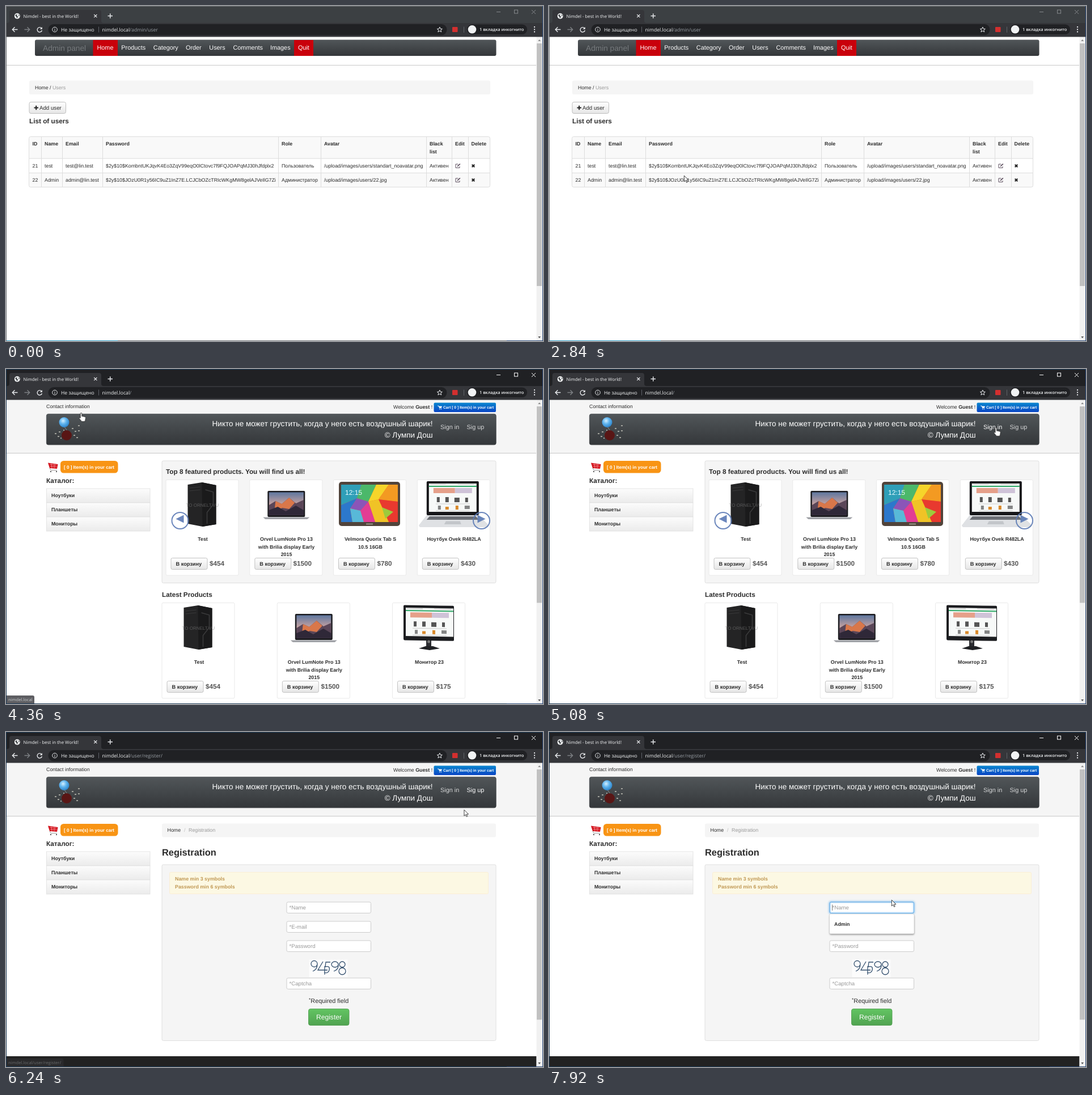
These frames come from a looping animation (947 px wide and 591 px high, 8000 ms). An HTML page:

```html
<!DOCTYPE html>
<html lang="ru">
<head>
<meta charset="utf-8">
<title>Nimdel</title>
<style>
html, body { margin: 0; width: 100%; height: 100%; overflow: hidden; background: #fff; }
svg { display: block; width: 100%; height: 100%; }
text { font: 8.85px "Liberation Sans", Arial, sans-serif; fill: #2c2c2c; white-space: pre; text-rendering: geometricPrecision; }
.ui text { font-family: "Open Sans", "Noto Sans", sans-serif; fill: #f1f3f4; }
.ui .path { fill: #9aa0a6; }
.ui .url { font-size: 8.65px; }
.b, .b text { font-weight: 700; }
.mid text, text.mid { text-anchor: middle; }
.quote text { font-size: 13.5px; fill: #fff; text-anchor: end; }
.nav text { font-size: 10.85px; fill: #fff; }
.h { font-size: 11.75px; font-weight: 700; }
.price text { font-size: 11.7px; font-weight: 700; fill: #555; }
.hint text { font-size: 9.65px; fill: #999; }
.warn text { fill: #c09853; font-weight: 700; }
.line { fill: none; stroke: #e8eaed; stroke-width: 1.4; }

/* One shared 8 s clock; 1% is 80 ms */
.a { animation: 8s step-end infinite; }
.admin { animation-name: admin; }
.shop { animation-name: shop; }
.home { animation-name: home; }
.reg { animation-name: reg; }
.loading { animation-name: loading; }
.idle { animation-name: idle; }
.bar { animation-name: bar; }
.ctl { animation-name: ctl; }
.edge { animation-name: edge; }
.url1 { animation-name: url1; }
.url2 { animation-name: url2; }
.url3 { animation-name: url3; }
.signin { animation-name: signin; }
.sigup { animation-name: sigup; }
.drop { animation-name: drop; }
.focus { animation: focus 8s linear infinite; }
.tip1 { animation: tip1 8s linear infinite; }
.tip2 { animation: tip2 8s linear infinite; }
.cur { animation: move 8s linear infinite; }
.arrow { animation-name: arrow; }
.hand { animation-name: hand; }
.click { animation-name: click; }

@keyframes admin { 0% { visibility: visible } 52%, 100% { visibility: hidden } }
@keyframes shop { 0% { visibility: hidden } 52%, 100% { visibility: visible } }
@keyframes home { 0% { visibility: hidden } 52% { visibility: visible } 74%, 100% { visibility: hidden } }
@keyframes reg { 0% { visibility: hidden } 74%, 100% { visibility: visible } }
@keyframes loading { 0% { visibility: hidden } 71.5% { visibility: visible } 74%, 100% { visibility: hidden } }
@keyframes idle { 0% { visibility: visible } 71.5% { visibility: hidden } 74%, 100% { visibility: visible } }
@keyframes bar { 0% { fill: #3c4043 } 49%, 100% { fill: #202124 } }
@keyframes ctl { 0% { stroke: #85888c } 49%, 100% { stroke: #fff } }
@keyframes edge { 0% { stroke: #6b6f73 } 49%, 100% { stroke: #1d3a56 } }
@keyframes url1 { 0% { visibility: visible } 51%, 100% { visibility: hidden } }
@keyframes url2 { 0% { visibility: hidden } 51% { visibility: visible } 71.5%, 100% { visibility: hidden } }
@keyframes url3 { 0% { visibility: hidden } 71.5%, 100% { visibility: visible } }
@keyframes signin { 0% { fill: #d6d7d8 } 63% { fill: #fff } 66%, 100% { fill: #d6d7d8 } }
@keyframes sigup { 0% { fill: #d6d7d8 } 66.5% { fill: #fff } 79%, 100% { fill: #d6d7d8 } }
@keyframes drop { 0% { visibility: hidden } 94%, 100% { visibility: visible } }
@keyframes focus { 0%, 92.4% { opacity: 0 } 95%, 100% { opacity: 1 } }
@keyframes tip1 { 0%, 42.5% { opacity: 0 } 46%, 52% { opacity: 1 } 54.5% { opacity: .8 } 57.5%, 100% { opacity: 0 } }
@keyframes tip2 { 0%, 66.5% { opacity: 0 } 69%, 75.5% { opacity: 1 } 78% { opacity: .45 } 80.5%, 100% { opacity: 0 } }
@keyframes arrow {
  0% { visibility: hidden } 17.5% { visibility: visible } 42.5% { visibility: hidden }
  56% { visibility: visible } 63% { visibility: hidden } 77%, 100% { visibility: visible }
}
@keyframes hand {
  0% { visibility: hidden } 42.5% { visibility: visible } 56% { visibility: hidden }
  63% { visibility: visible } 77%, 100% { visibility: hidden }
}
@keyframes click {
  0% { visibility: hidden } 48.4% { visibility: visible } 51% { visibility: hidden }
  69.5% { visibility: visible } 71% { visibility: hidden }
  88.4% { visibility: visible } 90.4%, 100% { visibility: hidden }
}
@keyframes move {
  0%, 17.4% { transform: translate(505px, 584px); animation-timing-function: cubic-bezier(.35, .1, .4, 1) }
  27.5%, 35.5% { transform: translate(238px, 299px); animation-timing-function: cubic-bezier(.4, 0, .4, 1) }
  45%, 54.5% { transform: translate(132.5px, 78px); animation-timing-function: cubic-bezier(.45, 0, .45, 1) }
  64.5% { transform: translate(796px, 104px); animation-timing-function: ease-out }
  68.5%, 75.5% { transform: translate(834.5px, 115px); animation-timing-function: cubic-bezier(.5, 0, .5, 1) }
  85.5% { transform: translate(583.5px, 320px); animation-timing-function: ease-in-out }
  88.4%, 94% { transform: translate(596px, 297px); animation-timing-function: ease-out }
  99%, 100% { transform: translate(604px, 296px) }
}
</style>
</head>
<body>
<svg viewBox="0 0 947 591">
<defs>
  <linearGradient id="dark" x2="0" y2="1"><stop stop-color="#515659"/><stop offset="1" stop-color="#34373a"/></linearGradient>
  <linearGradient id="btn" x2="0" y2="1"><stop stop-color="#fff"/><stop offset="1" stop-color="#e6e6e6"/></linearGradient>
  <linearGradient id="row" x2="0" y2="1"><stop stop-color="#fcfcfc"/><stop offset="1" stop-color="#ebebeb"/></linearGradient>
  <linearGradient id="blue" x2="0" y2="1"><stop stop-color="#0a86cf"/><stop offset="1" stop-color="#0a45c4"/></linearGradient>
  <linearGradient id="green" x2="0" y2="1"><stop stop-color="#62c462"/><stop offset="1" stop-color="#51a351"/></linearGradient>
  <linearGradient id="sky" x2="0" y2="1"><stop stop-color="#5f779f"/><stop offset=".55" stop-color="#c9a3a0"/><stop offset="1" stop-color="#4a3550"/></linearGradient>
  <radialGradient id="ball" cx=".4" cy=".35" r=".65"><stop stop-color="#d4efff"/><stop offset=".5" stop-color="#5fb4ee"/><stop offset="1" stop-color="#2f86cc"/></radialGradient>
  <filter id="soft" x="-10%" y="-30%" width="120%" height="170%"><feGaussianBlur stdDeviation="1.4"/></filter>

  <path id="cross" d="M-2.6-2.6 2.6 2.6M2.6-2.6-2.6 2.6"/>
  <g id="edit" fill="none" stroke="#4a3a4c"><path d="M1 .5H-3.500V7H3.500V4.500" stroke-width=".9"/><path d="M-.5 4.500 4.300 0" stroke-width="1.600"/></g>
  <path id="del" d="M-2.300-2.300 2.300 2.300M2.300-2.300-2.300 2.300" stroke="#222" stroke-width="2"/>

  <g id="card">
    <rect x=".5" y=".5" width="128" height="168.500" rx="2" fill="#fff" stroke="#e9e9e9"/>
    <rect x="9.500" y="138.500" width="64" height="20" rx="2.500" fill="url(#btn)" stroke="#c2c2c2"/>
    <text class="b" x="18" y="152" style="font-size:9.2px">В корзину</text>
  </g>
  <g id="tower">
    <path d="M39 9 64 5 89 10V79L65 83 39 78Z" fill="#242425"/>
    <path d="M64 5 89 10V79L65 83Z" fill="#1a1a1b"/>
    <path d="M42 15 61 13M42 20 61 18" stroke="#3a3a3b"/>
    <path d="M70 18 84 22V44L73 58V78" fill="none" stroke="#3c3c3d" stroke-width="1.500"/>
    <text x="36" y="48" style="font-size:8px;fill:#777" opacity=".65">TO ORNELT.VU</text>
  </g>
  <g id="note">
    <rect x="32" y="20" width="66" height="46" rx="2" fill="#1c1c20"/>
    <rect x="34.500" y="22.500" width="61" height="40" fill="url(#sky)"/>
    <path d="M34.500 45 46 38 57 43 70 32 82 42 95.500 36V62.500H34.500Z" fill="#5a4658"/>
    <path d="M46 38 57 43 70 32 80 41 70 52 58 50 44 56Z" fill="#d9774a"/>
    <path d="M34.500 54 50 48 64 56 82 46 95.500 54V62.500H34.500Z" fill="#2f2838"/>
    <path d="M24 66.500H106L102 70H28Z" fill="#a0a2a7"/>
  </g>
  <g id="tab">
    <rect x="10" y="4" width="108" height="78" rx="5" fill="#51443b"/>
    <g transform="translate(14 9)">
      <rect width="100" height="66" fill="#ef6a2d"/>
      <path d="M0 0H36L28 24 0 36Z" fill="#2f9fb8"/>
      <path d="M36 0H62L48 30 28 24Z" fill="#4bb86a"/>
      <path d="M62 0H84L66 26 48 30Z" fill="#f6d52a"/>
      <path d="M84 0H100V30L66 26Z" fill="#f39a22"/>
      <path d="M100 30V66H84L66 26Z" fill="#e8392f"/>
      <path d="M66 26 84 66H60L48 30Z" fill="#f0c326"/>
      <path d="M48 30 60 66H40L34 46Z" fill="#e23d94"/>
      <path d="M28 24 48 30 34 46 16 42Z" fill="#8b55b8"/>
      <path d="M0 36 28 24 16 42 20 66H0Z" fill="#2c78cc"/>
      <path d="M16 42 34 46 40 66H20Z" fill="#58b9d8"/>
      <path d="M72 40 92 48 78 60Z" fill="#9ccb3c"/>
      <text x="7" y="18" style="font-size:12px;fill:#e8fbff">12:15</text>
    </g>
    <path d="M58 78.500H70" stroke="#998" stroke-width="2"/>
  </g>
  <g id="shot">
    <rect width="84" height="50" fill="#f7f9f8"/>
    <path d="M0 5H84" stroke="#2da866" stroke-width="2"/><path d="M2 1.500H30M50 1.500H80" stroke="#bbb"/>
    <path d="M8 8H46V17H8Z" fill="#e5a08a"/><path d="M46 8H76V17H46Z" fill="#cfc3d8"/>
    <g fill="#555"><path d="M14 24H19V33H14ZM29 24H35V33H29ZM45 25H54V33H45ZM64 25H69V33H64Z"/><path d="M16 39H21V46H16ZM63 39H72V45H63Z" opacity=".7"/></g>
    <path d="M29 41H35V46H29ZM47 39H52V46H47Z" fill="#d98a2c"/>
    <path d="M12 36H72M12 48H72" stroke="#ccc"/>
  </g>
  <g id="laptop">
    <rect x="17" y="3" width="92" height="60" rx="2" fill="#17171a"/>
    <use href="#shot" x="21" y="7"/>
    <path d="M17 63H109L127 81 125 84H5L3 81Z" fill="#dfe1e4"/>
    <path d="M22 65H104L109 71H17Z" fill="#6c6f75"/><path d="M51 73.500H76L78 79H48Z" fill="#c3c6ca"/>
  </g>
  <g id="screen">
    <rect x="20" y="4" width="89" height="62" rx="2" fill="#1c1d20" transform="skewY(1)"/>
    <use href="#shot" transform="translate(24 9) skewY(1)"/>
    <path d="M60 67H69V78H60Z" fill="#2b2c30"/><path d="M47 81 59 77H72L84 81 66 84Z" fill="#1f2023"/>
    <circle cx="64.500" cy="69" r="2.500" fill="#777"/>
  </g>
  <rect id="field" x="495" y=".5" width="148.500" height="19.500" rx="2.500" fill="#fff" stroke="#ccc"/>
</defs>

<rect width="947" height="591" fill="#fff"/>

<!-- Users table -->
<g class="a admin">
  <rect x="51" y="59.500" width="813.500" height="28.500" rx="3" fill="url(#dark)"/>
  <path d="M153.500 60H197V88H153.500ZM508 60H542V88H508Z" fill="#c9000b"/>
  <text x="65" y="78.500" style="font-size:13.7px;fill:#777b7e">Admin panel</text>
  <g class="nav">
    <text x="160.500" y="77">Home</text><text x="203.300" y="77">Products</text><text x="259.800" y="77">Category</text>
    <text x="317" y="77">Order</text><text x="358.300" y="77">Users</text><text x="400.500" y="77">Comments</text>
    <text x="466" y="77">Images</text><text x="515" y="77">Quit</text>
  </g>
  <path d="M1 104.500H935" stroke="#c8c8c8"/>
  <rect x="41" y="131.500" width="813" height="24.500" rx="3" fill="#f5f5f5"/>
  <text x="51" y="146.500">Home / <tspan fill="#999">Users</tspan></text>
  <rect x="41" y="169.500" width="64.500" height="20" rx="3" fill="url(#btn)" stroke="#bdbdbd"/>
  <path d="M49.500 179.500H57M53.200 175.800V183.300" stroke="#222" stroke-width="2"/>
  <text x="59" y="183" style="font-size:9.7px">Add user</text>
  <text class="h" x="41" y="207">List of users</text>
  <rect x="41" y="231" width="813" height="89" rx="3" fill="#f9f9f9"/>
  <path d="M41 269.500H854V294.500H41Z" fill="#fff"/>
  <g fill="none" stroke="#ddd">
    <rect x="40.500" y="230.500" width="813" height="89" rx="3"/>
    <path d="M41 269H854M41 294.500H854M62.500 231V320M99.500 231V320M170.500 231V320M480.500 231V320M555.500 231V320M741.500 231V320M786.500 231V320M815.500 231V320"/>
  </g>
  <g class="b">
    <text x="46.500" y="246">ID</text><text x="68" y="246">Name</text><text x="105" y="246">Email</text><text x="176" y="246">Password</text>
    <text x="486" y="246">Role</text><text x="561" y="246">Avatar</text><text x="747" y="246">Black</text><text x="747" y="260">list</text>
    <text x="792" y="246">Edit</text><text x="820.500" y="246">Delete</text>
  </g>
  <text x="46.500" y="285">21</text><text x="68" y="285">test</text><text x="105" y="285">test@lin.test</text>
  <text x="176" y="285">$2y$10$KombntUKJqvK4Eo3ZqV99eqO0lCtovc7f9FQJOAPqMJ30hJfdplx2</text>
  <text x="486" y="285">Пользователь</text><text x="561" y="285">/upload/images/users/standart_noavatar.png</text><text x="747" y="285">Активен</text>
  <text x="46.500" y="310">22</text><text x="68" y="310">Admin</text><text x="105" y="310">admin@lin.test</text>
  <text x="176" y="310">$2y$10$JOzU0R1y56IC9uZ1InZ7E.LCJCbOZcTRIcWKgMW8gelAJVeIlG7Zi</text>
  <text x="486" y="310">Администратор</text><text x="561" y="310">/upload/images/users/22.jpg</text><text x="747" y="310">Активен</text>
  <use href="#edit" x="796.500" y="278.500"/><use href="#edit" x="796.500" y="303.500"/>
  <use href="#del" x="824" y="282"/><use href="#del" x="824" y="307"/>
</g>

<!-- Shop header and side column -->
<g class="a shop">
  <rect x="1" y="54" width="934.500" height="94" fill="#f5f5f5"/>
  <path d="M1 148.500H935" stroke="#c8c8c8"/>
  <text x="71" y="69">Contact information</text>
  <text x="683" y="70">Welcome <tspan class="b">Guest</tspan> !</text>
  <rect x="754.500" y="59.500" width="109.500" height="16.500" rx="2" fill="url(#blue)"/>
  <path d="M761 65H763L764.300 68.500H767.500L768.500 66H763.500" fill="#fff" stroke="#fff" stroke-width=".7"/><path d="M764 70.500H765.300M766.700 70.500H768" stroke="#fff" stroke-width="1.300"/>
  <text class="b" x="771" y="70" style="font-size:6.7px;fill:#fff">Cart [ 0 ] Item(s) in your cart</text>
  <rect x="71.300" y="79.300" width="793" height="54.500" rx="3.500" fill="url(#dark)" stroke="#3a3d40" stroke-width=".6"/>
  <path d="M103 102 110 112" stroke="#bbb" stroke-width=".6"/>
  <circle cx="102.500" cy="94" r="9" fill="url(#ball)"/>
  <circle cx="107" cy="117" r="9" fill="#591615"/>
  <path d="M86 114h3M91 119h3M93 111h3M96 122h2M116 105h3M121 110h3M127 100h3M127 109h3M119 117h3M124 121h3M101 108h2" stroke="#b9b9b0" stroke-width="2" opacity=".8"/>
  <g class="quote">
    <text x="752.500" y="101">Никто не может грустить, когда у него есть воздушный шарик!</text>
    <text x="752.500" y="121">© Лумпи Дош</text>
  </g>
  <g class="nav"><text class="a signin" x="766" y="106">Sign in</text><text class="a sigup" x="812.500" y="106">Sig up</text></g>
  <path d="M74 165.500 91.500 168 90 176 77 175Z" fill="#d3121c"/>
  <path d="M77 168 89 169.500M78 171.500 89.500 172.500M80 167 81 175M85 167.500V175" stroke="#f6a5a8" stroke-width=".7"/>
  <path d="M77 175 79 178.500H90" stroke="#999" fill="none"/><path d="M78 181h2M88 181h2" stroke="#555" stroke-width="2"/>
  <rect x="96" y="162" width="101.500" height="21.500" rx="5.500" fill="#f89414"/>
  <text class="b" x="102" y="175.500" style="font-size:8.05px;fill:#fff">[ 0 ] Item(s) in your cart</text>
  <text class="h" x="71" y="201">Каталог:</text>
  <g fill="url(#row)" stroke="#dedede" stroke-width=".8">
    <rect x="71.500" y="211" width="182.500" height="25"/><rect x="71.500" y="236" width="182.500" height="25"/><rect x="71.500" y="261" width="182.500" height="25"/>
  </g>
  <g class="b"><text x="80" y="226">Ноутбуки</text><text x="80" y="251">Планшеты</text><text x="80" y="276">Мониторы</text></g>
</g>

<!-- Shop front -->
<g class="a home">
  <rect x="275" y="162" width="589" height="215.500" rx="2.500" fill="#f5f5f5" stroke="#dfdfdf"/>
  <text class="h" x="282" y="185">Top 8 featured products. You will find us all!</text>
  <use href="#card" x="281.500" y="195"/><use href="#card" x="429.300" y="195"/><use href="#card" x="577" y="195"/><use href="#card" x="724.800" y="195"/>
  <use href="#tower" x="281.500" y="195"/><use href="#note" x="429.300" y="195"/><use href="#tab" x="577" y="195"/><use href="#laptop" x="724.800" y="195"/>
  <g class="b mid">
    <text x="347" y="303">Test</text>
    <text x="494.500" y="303">Orvel LumNote Pro 13</text><text x="494.500" y="316.500">with Brilia display Early</text><text x="494.500" y="330">2015</text>
    <text x="642.500" y="303">Velmora Quorix Tab S</text><text x="642.500" y="316.500">10.5 16GB</text>
    <text x="790" y="303">Ноутбук Ovek R482LA</text>
  </g>
  <g class="price"><text x="359" y="347">$454</text><text x="506.500" y="347">$1500</text><text x="654.500" y="347">$780</text><text x="802" y="347">$430</text></g>
  <g fill="none" stroke="#5b7ab5" stroke-width="2" opacity=".9">
    <circle cx="307" cy="267.500" r="14.500"/><circle cx="838.500" cy="267.500" r="14.500"/>
    <path d="M299.500 264.500 313.500 257.500V271.500ZM845.500 264.500 831.500 257.500V271.500Z" fill="#5b7ab5" stroke="none"/>
  </g>
  <text class="h" x="275" y="402">Latest Products</text>
  <use href="#card" x="274.500" y="412"/><use href="#card" x="477.800" y="412"/><use href="#card" x="681" y="412"/>
  <use href="#tower" x="274.500" y="412"/><use href="#note" x="477.800" y="412"/><use href="#screen" x="681" y="412"/>
  <g class="b mid">
    <text x="340.500" y="520">Test</text>
    <text x="543.300" y="520">Orvel LumNote Pro 13</text><text x="543.300" y="533.500">with Brilia display Early</text><text x="543.300" y="547">2015</text>
    <text x="746.500" y="520">Монитор 23</text>
  </g>
  <g class="price"><text x="352" y="564">$454</text><text x="555.500" y="564">$1500</text><text x="758.500" y="564">$175</text></g>
</g>

<!-- Registration form -->
<g class="a reg">
  <rect x="275" y="161.500" width="589" height="24" rx="3" fill="#f5f5f5"/>
  <text x="284.500" y="176">Home</text><text x="314" y="176" style="fill:#bbb">/</text><text x="322" y="176" style="fill:#999">Registration</text>
  <text class="b" x="275" y="218" style="font-size:16.45px">Registration</text>
  <rect x="275" y="234" width="589" height="310.500" rx="2.500" fill="#f5f5f5" stroke="#e0e0e0"/>
  <rect x="288.500" y="247.500" width="562" height="38" rx="2" fill="#fcf8e3" stroke="#fbeed5"/>
  <g class="warn"><text x="298" y="262">Name min 3 symbols</text><text x="298" y="276">Password min 6 symbols</text></g>
  <use href="#field" y="299.500"/><use href="#field" y="333.500"/><use href="#field" y="367.500"/><use href="#field" y="433.500"/>
  <rect x="534.500" y="401.500" width="68" height="31" fill="#fcfcfc"/>
  <path fill="none" stroke="#34506f" stroke-width="1.300" d="M549 409a5.500 5.500 0 1 1-11 0a5.500 5.500 0 1 1 11 0Q549 419 541 422M559 405 550 420H567M562 413V428M572 406H564L563 414Q572 412 570 420 568 427 561 424M586 410a6 5 0 1 1-12 0a6 5 0 1 1 12 0Q587 419 578 422M598 410a5 5 0 1 1-10 0a5 5 0 1 1 10 0M599 422a6 6 0 1 1-12 0a6 6 0 1 1 12 0"/>
  <g class="hint"><text x="499.500" y="313">*Name</text><text x="499.500" y="347">*E-mail</text><text x="499.500" y="381">*Password</text><text x="499.500" y="447">*Captcha</text></g>
  <text x="534" y="474.500" style="font-size:8px">*</text><text x="537.300" y="478" style="font-size:10.85px">Required field</text>
  <rect x="533.500" y="488.500" width="71.500" height="29" rx="3.500" fill="url(#green)" stroke="#4a9a4a" stroke-width=".8"/>
  <text class="mid" x="569.500" y="507" style="font-size:12.1px;fill:#fff">Register</text>
  <rect x="1" y="572" width="934.500" height="18.500" fill="#222"/>
  <g class="focus">
    <rect x="494.500" y="299.500" width="149.500" height="20.500" rx="3" fill="none" stroke="#52a8ec" stroke-width="3" opacity=".5" filter="url(#soft)"/>
    <rect x="495" y="300" width="148.500" height="19.500" rx="2.500" fill="none" stroke="#62b0ee"/>
    <path d="M499.700 304.500V315" stroke="#555" stroke-width=".8"/>
  </g>
  <g class="a drop">
    <rect x="495" y="323" width="149" height="34.500" rx="2" opacity=".45" filter="url(#soft)"/>
    <rect x="494.500" y="321" width="149.500" height="35" rx="2" fill="#fff" stroke="#ccc" stroke-width=".7"/>
    <text class="b" x="503" y="342">Admin</text>
  </g>
</g>

<!-- Scrollbar -->
<rect x="935.500" y="54" width="10.500" height="537" fill="#f1f1f1"/>
<g fill="#c1c1c1">
  <rect class="a admin" x="936" y="66" width="9" height="428"/>
  <rect class="a home" x="936" y="66" width="9" height="346.500"/>
  <rect class="a reg" x="936" y="66" width="9" height="441.500"/>
</g>
<path d="M938.300 62 940.600 59 943 62Z" fill="#888"/><path d="M938.300 583 940.600 586 943 583Z" fill="#505050"/>

<!-- Browser frame -->
<g class="ui">
  <rect class="a bar" width="947" height="31"/>
  <path d="M2 30Q6 30 6 26V11Q6 7 10 7H164Q168 7 168 11V26Q168 30 172 30H947V54.500H0V30Z" fill="#35363a"/>
  <g class="a idle">
    <circle cx="19.800" cy="17.700" r="5" fill="#f1f3f4"/>
    <path d="M16 16 20 14.500 19 17.500 21.500 18.500 19.500 21.500 18 19ZM22 14 24 17 22.500 18Z" fill="#3c4043"/>
    <text x="30.500" y="20.500" style="font-size:7.85px">Nimdel - best in the World!</text>
    <path class="line" d="M62.700 39.300A4.200 4.200 0 1 0 63.400 43"/><path d="M63.800 37V41H59.800Z" fill="#e8eaed"/>
  </g>
  <g class="a loading">
    <circle cx="18.500" cy="13" r=".8" fill="#c5c8cc"/>
    <text x="30.500" y="20.500" style="font-size:7.6px">nimdel.local/user/register/</text>
    <path class="line" d="M55.500 38 63 45.500M63 38 55.500 45.500"/>
  </g>
  <use href="#cross" class="line" x="157.800" y="17.600" style="stroke-width:1.2"/>
  <path class="line" d="M179.500 17.500H188M183.700 13.300V21.800"/>
  <path class="line" d="M20.500 41.500H11.500M15.500 37.300 11.300 41.500 15.500 45.700"/>
  <path class="line" d="M32.500 41.500H41.500M37.500 37.300 41.700 41.500 37.500 45.700" style="stroke:#7d8084"/>
  <g class="a ctl" fill="none">
    <path d="M865 10.500H872"/><rect x="896.500" y="7" width="6" height="6"/><path d="M927 7 934 14M934 7 927 14"/>
  </g>
  <rect x="74.500" y="32" width="703" height="19.500" rx="9.750" fill="#202124"/>
  <circle class="line" cx="86" cy="41.500" r="4.300" style="stroke-width:1"/><path d="M86 41V44M86 39V40" stroke="#e8eaed"/>
  <text x="97" y="45" style="font-size:8.6px">Не защищено</text>
  <path d="M163.500 36.500V46.500" stroke="#5f6368"/>
  <text class="a url url1" x="169.500" y="45">nimdel.local<tspan class="path">/admin/user</tspan></text>
  <text class="a url url2" x="169.500" y="45">nimdel.local<tspan class="path">/</tspan></text>
  <text class="a url url3" x="169.500" y="45">nimdel.local<tspan class="path">/user/register/</tspan></text>
  <path class="line" style="stroke-width:1" d="M764.800 37 766.100 40.200 769.300 40.400 766.800 42.500 767.700 45.800 764.800 44 761.900 45.800 762.800 42.500 760.300 40.400 763.500 40.200Z"/>
  <rect x="787" y="37" width="9.500" height="9" rx="1" fill="#d32f2f"/>
  <path d="M807.500 36.500V47" stroke="#5f6368"/>
  <rect x="813" y="32.500" width="106" height="17.500" rx="8.750" fill="#202124"/>
  <circle cx="822" cy="41.300" r="7.300" fill="#f1f3f4"/>
  <text x="835" y="44" style="font-size:7.4px;font-weight:600">1 вкладка инкогнито</text>
  <path d="M931 37h2M931 41.300h2M931 45.600h2" stroke="#e8eaed" stroke-width="2"/>

  <!-- Link hint -->
  <g class="tip1">
    <path d="M0 576H47Q50 576 50 579V590.500H0Z" fill="#35363a"/><text x="4" y="586" style="font-size:7.55px;fill:#bdc1c6">nimdel.local</text>
  </g>
  <g class="tip2">
    <path d="M0 576H98.500Q101.500 576 101.500 579V590.500H0Z" fill="#35363a"/><text x="4" y="586" style="font-size:7.55px;fill:#bdc1c6">nimdel.local/user/register/</text>
  </g>
</g>
<path class="a edge" fill="none" d="M.5 0V591M0 .5H947M0 590.500H947"/>
<path d="M946.500 0V591M883 590.500H947" stroke="#2c4a78"/>
<path class="a admin" d="M1 590.500H197" stroke="#2f9cc4"/>

<!-- Pointer -->
<g class="cur">
  <circle class="a click" r="8" fill="#dccb00" opacity=".8"/>
  <path class="a arrow" d="M.3.300V11L2.800 8.700 4.500 12.500 6.200 11.700 4.500 8H8Z" fill="#fff" stroke="#111" stroke-width=".8"/>
  <path class="a hand" d="M-1.300 8.500V.8a1.300 1.300 0 0 1 2.600 0V5.200l1.600.1 3.600.9c1.200.3 1.600 1 1.500 2.100l-.6 3.700-1 2.700H1L-3.200 9.600c-.8-1.200-.1-2.200.9-1.900Z" fill="#fff" stroke="#111" stroke-width=".8"/>
</g>
</svg>
</body>
</html>
```
